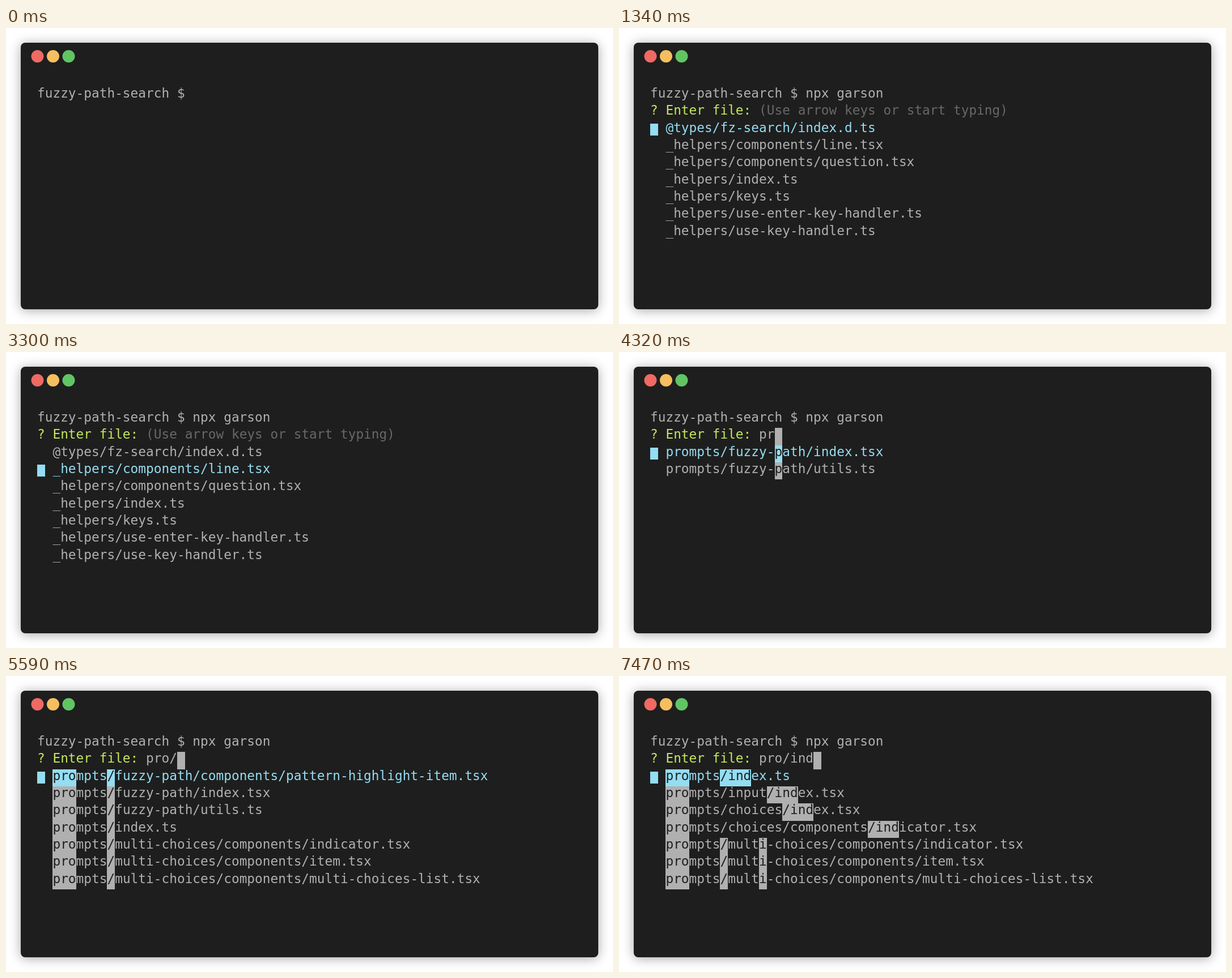
These frames come from a looping animation (1071 px wide and 523 px high, 8 s). An HTML page:

```html
<!DOCTYPE html>
<html lang="en">
<head>
<meta charset="utf-8">
<title>Fuzzy path prompt</title>
<style>
html, body { margin: 0; width: 100%; height: 100%; overflow: hidden; background: #fff; }
#window {
  position: absolute; left: 26px; top: 26px; width: 1019px; height: 471px;
  border-radius: 8px; background: #1e1e1e; box-shadow: 0 2px 20px rgba(0, 0, 0, .35);
}
svg { position: absolute; left: 0; top: 0; }
text { font: 22.79px "DejaVu Sans Mono", monospace; white-space: pre; }
rect { shape-rendering: crispEdges; }
</style>
</head>
<body>
<div id="window"></div>
<svg width="1071" height="523">
  <circle cx="55.5" cy="50" r="11" fill="#ee6a63"/>
  <circle cx="83" cy="50" r="11" fill="#f5bf60"/>
  <circle cx="110.5" cy="50" r="11" fill="#61c564"/>
  <g id="screen"></g>
</svg>
<script>
const LOOP = 8000, LEFT = 55, TOP = 103.9, COL = 13.72, ROW = 30.36, BASELINE = 18.9;
const GRAY = '#b0b0b0', DIM = '#686868', LIME = '#c3e95c', CYAN = '#94ddf2', DARK = '#1e1e1e';
const screen = document.getElementById('screen');

// Square brackets mark the matched characters.
const helpers = ['components/line.tsx', 'components/question.tsx', 'index.ts', 'keys.ts',
  'use-enter-key-handler.ts', 'use-key-handler.ts'].map(s => '_helpers/' + s);
const allFiles = ['@types/fz-search/index.d.ts', ...helpers];

const matchP = ['index.tsx', 'utils.ts'].map(s => 'prompts/fuzzy-[p]ath/' + s);

const parts = ['indicator.tsx', 'item.tsx', 'multi-choices-list.tsx'];
const matchSlash = ['fuzzy-path/components/pattern-highlight-item.tsx', 'fuzzy-path/index.tsx',
  'fuzzy-path/utils.ts', 'index.ts', ...parts.map(s => 'multi-choices/components/' + s)]
  .map(s => '[pro]mpts[/]' + s);
const matchPro = matchSlash.map(s => s.replace('[/]', '/'));
const matchPr = matchPro.map(s => s.replace('[pro]', '[pr]o'));

const multi = s => '[pro]mpts[/]mult[i]-choices/' + s;
const multiParts = parts.map(s => multi('components/' + s));
const matchI = ['[pro]mpts[/i]ndex.ts', ...multiParts, multi('index.tsx'),
  multi('use-multi-choices-navigation.ts'), '[pro]mpts[/i]nput/index.tsx'];
const matchInd = ['[/ind]ex.ts', '/input[/ind]ex.tsx', '/choices[/ind]ex.tsx',
  '/choices/components[/ind]icator.tsx'].map(s => '[pro]mpts' + s).concat(multiParts);
const matchIn = matchInd.map(s => s.replace('ind]', 'in]d').replace('/input[/in]', '[/in]put/in'));

// Start time, typed query, list, selected row (-1: none)
const steps = [
  [1040, '', [], -1],
  [1340, '', allFiles, 0],
  [2810, '', allFiles, 1],
  [2940, '', allFiles, 2],
  [3300, '', allFiles, 1],
  [3450, '', allFiles, 0],
  [4080, 'p', allFiles, 0],
  [4180, 'p', matchP, 0],
  [4320, 'pr', matchP, 0],
  [4420, 'pr', matchPr, -1],
  [4630, 'pro', matchPr, -1],
  [4830, 'pro', matchPro, 0],
  [5290, 'pro/', matchPro, 0],
  [5590, 'pro/', matchSlash, 0],
  [6500, 'pro/i', matchSlash, 0],
  [6700, 'pro/i', matchI, -1],
  [6800, 'pro/i', matchI, 0],
  [6990, 'pro/in', matchI, 0],
  [7090, 'pro/in', matchIn, 0],
  [7370, 'pro/ind', matchIn, 0],
  [7470, 'pro/ind', matchInd, 0],
];

const text = (col, row, str, color) =>
  `<text x="${LEFT + col * COL}" y="${TOP + row * ROW + BASELINE}" fill="${color}">${str}</text>`;

const block = (col, row, count, color) =>
  `<rect x="${LEFT + col * COL}" y="${TOP + row * ROW}" width="${count * COL}" height="${ROW}" fill="${color}"/>`;

function item(str, row, selected) {
  const color = selected ? CYAN : GRAY;
  let col = 2, out = '';
  if (selected) out += `<rect x="${LEFT}" y="${TOP + row * ROW + 4}" width="14" height="21" fill="${CYAN}"/>`;
  str.split(/[\[\]]/).forEach((part, i) => {
    const hit = i % 2;
    if (hit) out += block(col, row, part.length, color);
    out += text(col, row, part, hit ? DARK : color);
    col += part.length;
  });
  return out;
}

function render(t) {
  let out = text(0, 0, 'fuzzy-path-search $ ' + 'npx garson'.slice(0, Math.floor(t / 80)), GRAY);
  const step = steps.filter(s => s[0] <= t).pop();
  if (step) {
    const [, query, list, selected] = step;
    out += text(0, 1, '? Enter file:', LIME);
    out += query
      ? text(14, 1, query, GRAY) + block(14 + query.length, 1, 1, GRAY)
      : text(14, 1, '(Use arrow keys or start typing)', DIM);
    out += list.map((s, i) => item(s, i + 2, i === selected)).join('');
  }
  return out;
}

let start, shown;
function frame(now) {
  start ??= now;
  const next = render((now - start) % LOOP);
  if (next !== shown) screen.innerHTML = shown = next;
  requestAnimationFrame(frame);
}
requestAnimationFrame(frame);
</script>
</body>
</html>
```
